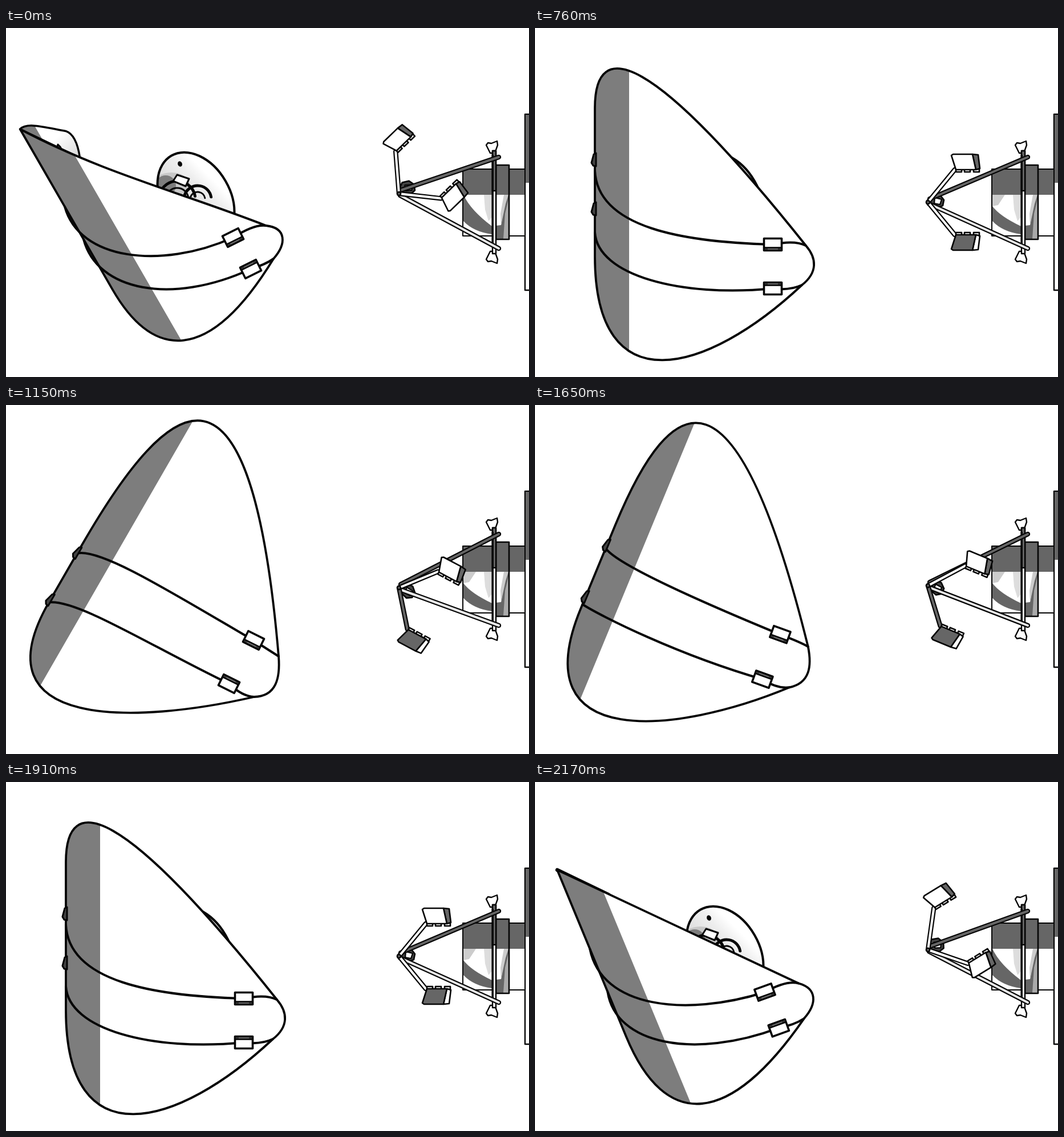
Recreate the animation shown at these times as an HTML page with a canvas. Size 917 px wide and 611 px high, loop 2300 ms.

```html
<!DOCTYPE html>
<html lang="en">
<head>
<meta charset="utf-8">
<title>Tilting shield</title>
<style>
html, body { margin: 0; width: 100%; height: 100%; overflow: hidden; background: #fff; }
canvas { display: block; width: 917px; height: 611px; }
</style>
</head>
<body>
<canvas id="stage" width="917" height="611"></canvas>
<script>
const ctx = document.getElementById('stage').getContext('2d');
const INK = '#050505', GREY = '#7d7d7d', DARK = '#666', WHITE = '#fff';
const RAD = Math.PI / 180;
const MAX_TILT = 30;

let tilt = 0; // degrees, negative is tipped up
let s = 0;    // tilt as -1..1

const mix = (a, b, t) => a + (b - a) * t;
const mixPoint = (p, q, t) => [mix(p[0], q[0], t), mix(p[1], q[1], t)];

// Quadratic swing through a value tipped up, level and tipped down
const swing = (up, level, down) =>
  level + s * (down - up) / 2 + s * s * ((down + up) / 2 - level);
const swingPoint = (ux, uy, lx, ly, dx, dy) => [swing(ux, lx, dx), swing(uy, ly, dy)];

// Point in the turning frame: inset from the left edge, height along it
function edge(height, inset = 0) {
  const sin = Math.sin(tilt * RAD), cos = Math.cos(tilt * RAD), side = inset - 42;
  return [147 + side * cos + height * sin, 305 + side * sin - height * cos];
}

function poly(list, closed = true) {
  const path = new Path2D();
  for (let i = 0; i < list.length; i += 2) path.lineTo(list[i], list[i + 1]);
  if (closed) path.closePath();
  return path;
}

function oval(x, y, rx, ry, turn = 0, from = 0, to = 360) {
  const path = new Path2D();
  path.ellipse(x, y, rx, ry, turn * RAD, from * RAD, to * RAD);
  return path;
}

function paint(path, fill, width) {
  if (fill) { ctx.fillStyle = fill; ctx.fill(path); }
  if (width) { ctx.lineWidth = width; ctx.strokeStyle = INK; ctx.stroke(path); }
}

function box(x, y, w, h, fill, width) {
  const path = new Path2D();
  path.rect(x, y, w, h);
  paint(path, fill, width);
}

function placed([x, y], deg, draw) {
  ctx.save();
  ctx.translate(x, y);
  ctx.rotate(deg * RAD);
  draw();
  ctx.restore();
}

function bar(x1, y1, x2, y2, fill) {
  const path = poly([x1, y1, x2, y2], false);
  paint(path, null, 8.4);
  ctx.lineWidth = 4;
  ctx.strokeStyle = fill;
  ctx.stroke(path);
}

// Shadow band running beside the left edge
function shadeLeft(path, inset) {
  ctx.save();
  ctx.clip(path);
  paint(poly([...edge(600, inset), ...edge(-600, inset), ...edge(-600, -200), ...edge(600, -200)]), GREY);
  ctx.restore();
}

function disc() {
  const plate = oval(333, 298, 60, 86, -30);
  const tone = ctx.createLinearGradient(320, 310, 375, 255);
  tone.addColorStop(0, '#ddd');
  tone.addColorStop(0.5, '#eee');
  tone.addColorStop(0.8, WHITE);
  paint(plate, tone);
  ctx.save();
  ctx.clip(plate);
  paint(oval(290, 274, 32, 21), '#c8c8c8');
  paint(oval(280, 276, 18, 18), GREY);
  ctx.restore();
  paint(plate, null, 4);
  for (const [x, r] of [[300, 32], [300, 20], [336, 24], [336, 13]])
    paint(oval(x, 300, r, r, 0, 190, 350), null, r > 20 ? 5 : 3);
  paint(poly([293,268, 300,257, 321,264, 315,277]), WHITE, 3);
  paint(oval(305, 238, 3.8, 4.8, -20), INK);
}

// Far lip of the sheet, flat at first, then opening
function rim(tip, open) {
  const at = (x, lift) => [tip[0] + x, tip[1] + 0.48 * x - lift * open];
  const path = new Path2D();
  path.moveTo(...tip);
  path.bezierCurveTo(...at(12, 18), ...at(40, 23), ...at(80, 35));
  path.quadraticCurveTo(...at(99, 38), ...at(105 - 24 * (1 - open), 0));
  path.closePath();
  const tone = ctx.createLinearGradient(90, 190, 125, 222);
  tone.addColorStop(0, WHITE);
  tone.addColorStop(1, '#ddd');
  paint(path, tone);
  shadeLeft(path, 25);
  paint(path, null, mix(6.5, 3.5, open));
  if (open > 0.5) paint(poly([88,214, 91,204, 95,208, 99,216]), GREY, 3);
}

function clip(centre, side) {
  placed(centre, tilt * 0.88, () => {
    ctx.scale(1, side);
    box(-15.5, -10.5, 31, 21, WHITE, 3.6);
    box(-15.5, 5.5, 31, 5, '#333', 2.4);
    box(-9, 7.2, 18, 1.4, GREY);
  });
}

function strap(start, bend, reach, centre, curl, end, side) {
  const path = new Path2D();
  path.moveTo(...start);
  path.bezierCurveTo(...bend, ...reach, ...centre);
  path.quadraticCurveTo(...curl, ...end);
  paint(path, null, 4);
  clip(centre, side);
}

function hook(height) {
  placed(edge(height), tilt, () => paint(poly([-6,4, -2,-11, 2,-13, 2,10, -3,9]), '#444', 3));
}

function shield() {
  const tip = edge(swing(172, 165, 45));
  const noseTop = swingPoint(456, 346, 475, 381, 478, 440);
  const noseEnd = swingPoint(469, 404, 468, 450, 435, 511);

  // The upper rim straightens as it tips up, then sags open
  const flat = Math.min(1, (Math.max(0, -s) / 0.75) ** 2);
  const open = Math.max(0, -s - 0.75) * 4;
  const rise = mixPoint(edge(swing(172, 290, 360)), mixPoint(tip, noseTop, 1 / 3), flat);
  const fall = mixPoint(swingPoint(200, 245, 203, 40, 430, -125), mixPoint(tip, noseTop, 2 / 3), flat);
  rise[1] += 20 * open;

  const body = new Path2D();
  body.moveTo(...tip);
  body.bezierCurveTo(...rise, ...fall, ...noseTop);
  body.bezierCurveTo(...swingPoint(492, 350, 494, 403, 481, 478),
    ...swingPoint(492, 378, 496, 428, 474, 510), ...noseEnd);
  body.bezierCurveTo(...swingPoint(354, 592, 300, 607, 230, 558),
    ...edge(swing(-292, -355, -330)), ...edge(swing(-152, -95, -70)));
  body.closePath();

  disc();
  if (flat === 1) rim(tip, open);
  paint(body, WHITE);
  shadeLeft(body, 60);
  paint(body, null, 3.8);

  const upper = swing(15, 55, 28), lower = swing(-51, -53, -71);
  strap(edge(upper), swingPoint(128, 405, 110, 350, 165, 250), swingPoint(270, 424, 260, 375, 290, 328),
    swingPoint(398, 367, 417, 379, 434, 412), swingPoint(435, 343, 455, 371, 470, 435), noseTop, 1);
  strap(edge(lower), swingPoint(160, 460, 110, 433, 125, 340), swingPoint(290, 486, 255, 472, 250, 420),
    swingPoint(429, 422, 417, 456, 391, 488), swingPoint(455, 414, 446, 460, 414, 510), noseEnd, -1);
  if (tilt >= 0) {
    hook(mix(upper + 18, upper, s));
    hook(mix(lower + 40, lower + 4, s));
  }
}

function drum() {
  box(910, 151, 9, 308, WHITE, 2.4);
  box(911, 152, 8, 119, DARK);
  box(801, 247, 109, 117, WHITE);
  box(801, 247, 109, 45, DARK);
  paint(poly([838,292, 853,292, 853,330, 846,338, 840,318]), '#ddd');
  if (tilt >= 0) paint(poly([802,292, 824,292, 812,310, 802,312]), '#ccc');
  const top = tilt < 0 ? 292 : 312;
  const shadow = new Path2D();
  shadow.moveTo(802, top);
  shadow.quadraticCurveTo(815, mix(top, 347, 0.5), 852, 347);
  shadow.lineTo(852, 361);
  shadow.quadraticCurveTo(820, 357, 802, 338);
  paint(shadow, DARK);
  box(801, 247, 109, 117, null, 2);
  box(859, 240, 23, 130, DARK);
  paint(poly([860,292, 880,292, 873,315, 868,345, 860,346]), WHITE);
  paint(poly([873,292, 881,292, 876,308, 868,345, 867,325]), '#ccc');
  paint(poly([881,300, 881,369, 872,369, 875,325]), '#aaa');
  box(859, 240, 23, 130, null, 2.6);
}

function post() {
  for (const side of [-1, 1]) {
    ctx.save();
    ctx.translate(853, 305);
    ctx.scale(1, side);
    paint(poly([-11,100, -8,104, -2,103, 8,107, 9,100, 4,86, -4,86]), WHITE, 2.4);
    ctx.restore();
  }
  box(853, 215, 6, 180, WHITE, 2.4);
  box(853, 215, 6, 70, DARK, 2.4);
  box(851.5, 222, 3.5, 160, INK);
}

// Arm and lamp in the frame of the joint
function lamp(side, armFill, face, flank) {
  bar(0, 0, 47, 57 * side, armFill);
  ctx.save();
  ctx.translate(66, 70 * side);
  ctx.scale(1, -side);
  for (const x of [-17, -2, 14]) box(x, 12, 10, 5, WHITE, 2.6);
  paint(poly([12,-14, 22,-13, 25,11, 18,13]), flank, 2.6);
  paint(poly([-25,-12, -22,-14, 12,-14, 18,13, -17,13]), face, 2.6);
  ctx.restore();
}

function mount() {
  const joint = [689, 305 + 15 * s], [x, y] = joint;
  const turn = 36 * s - 8 * s * s;
  const lit = tilt < 0;
  drum();
  post();
  placed([x + 15, y + 8 * s - 2], tilt * 0.6, () => {
    paint(poly([-13,-4, -6,-12, 6,-11, 13,-2, 11,8, 2,12, -12,5]), '#444', 2.6);
    paint(poly([-3,-6, 9,-3, 6,6, -4,4]), WHITE, 2.2);
  });
  bar(864, 226, x + 3, y - 6, DARK);
  bar(864, 386, x + 2, y + 3, '#e8e8e8');
  placed(joint, turn, () => {
    lamp(1, tilt > 0 ? DARK : WHITE, lit ? WHITE : DARK, lit ? DARK : WHITE);
    lamp(-1, WHITE, WHITE, DARK);
    paint(oval(0, 0, 3, 3), DARK, 2.4);
  });
}

// Held at both ends, with stepped travel in between
function stepAt(t) {
  if (t < 500) return -3;
  if (t < 1150) return -2 + Math.floor((t - 500) / 130);
  if (t < 1650) return 3;
  return 2 - Math.floor((t - 1650) / 130);
}

function render(step) {
  tilt = Math.max(-MAX_TILT, Math.min(MAX_TILT, 11.25 * step));
  s = tilt / MAX_TILT;
  ctx.fillStyle = WHITE;
  ctx.fillRect(0, 0, 917, 611);
  ctx.lineJoin = ctx.lineCap = 'round';
  shield();
  mount();
}

const start = performance.now();
function tick() {
  render(stepAt((performance.now() - start) % 2300));
  requestAnimationFrame(tick);
}
tick();
</script>
</body>
</html>
```
